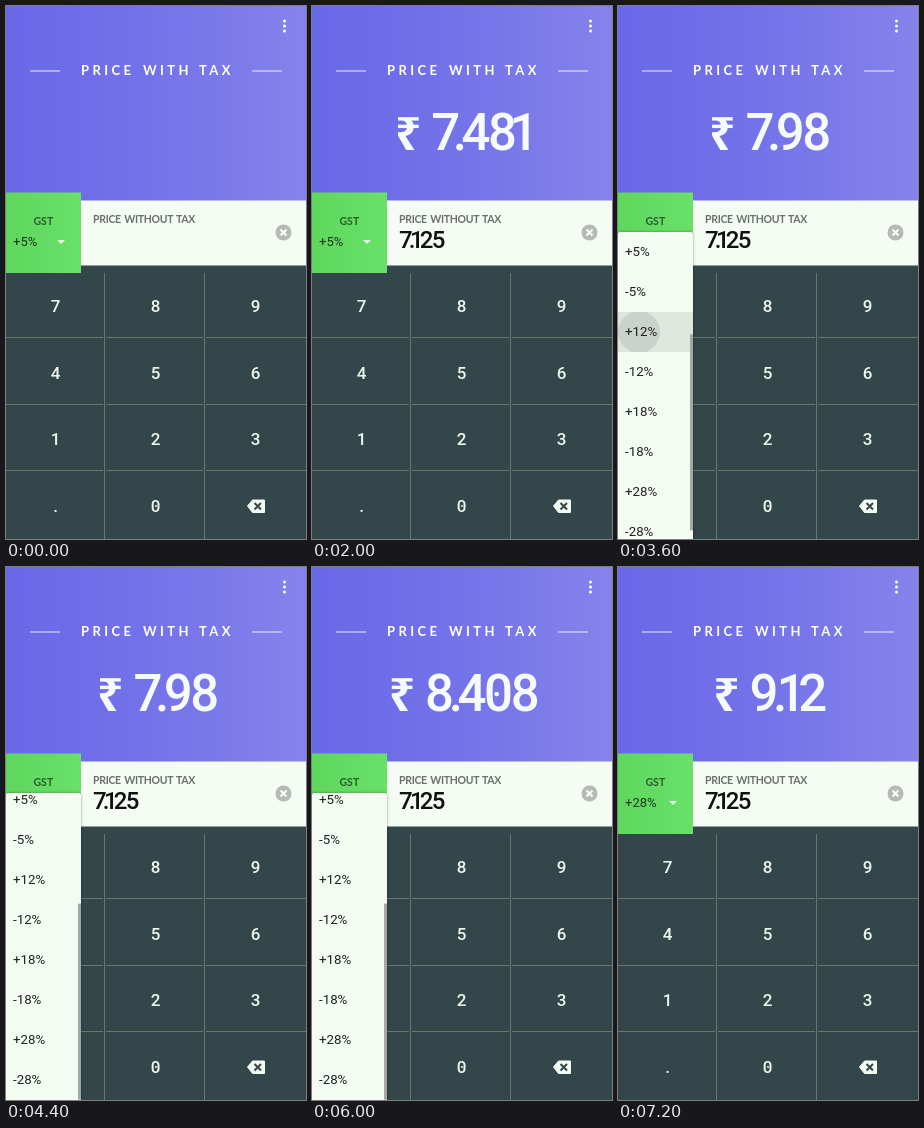
An HTML page that plays this animation: 300 px wide and 533 px high, repeating every 8000 ms.

```html
<!DOCTYPE html>
<html lang="en">
<head>
<meta charset="utf-8">
<title>Tax calculator</title>
<style>
  html, body { margin: 0; width: 100%; height: 100%; overflow: hidden; background: #33464a; }
  #stage { position: relative; width: 300px; height: 533px; overflow: hidden; font-family: Roboto, sans-serif; }
  svg { position: absolute; left: 0; top: 0; }
  .caps { font-family: Lato, sans-serif; font-weight: 700; }
  .title { font-size: 13px; letter-spacing: 3.4px; fill: #fff; }
  .key { font-size: 17px; font-weight: 500; fill: #edf7ee; text-anchor: middle; }

  #price {
    position: absolute; left: 0; top: 96px; width: 302px; height: 60px;
    display: flex; justify-content: center; align-items: baseline;
    color: #f6fbff; line-height: 60px; white-space: nowrap;
  }
  #price b { font: 900 46px/60px "Noto Sans", sans-serif; margin-right: 10px; }
  #total { font-size: 51px; font-weight: 500; letter-spacing: -.047em; }
  #value {
    position: absolute; left: 87px; top: 219px; line-height: 30px;
    font-size: 24px; font-weight: 500; letter-spacing: -.065em; color: #111; white-space: nowrap;
  }
  .dot { margin: 0 -.06em; }
  .d7 { margin-right: -.04em; }
  .d1 { margin: 0 -.1em 0 -.1em; }
  .d0 { background: radial-gradient(circle at 47% 51%, currentColor 0 2px, transparent 2.6px); }

  #rate { position: absolute; left: 7px; top: 226px; font-size: 13px; line-height: 20px; color: #17331b; }
  #menu {
    position: absolute; left: 0; top: 226px; width: 75px; height: 307px; overflow: hidden;
    background: #f4fbf3; border-radius: 2px 2px 0 0; box-shadow: 0 0 3px #0006;
  }
  #list div {
    position: relative; height: 40px; padding-left: 7px; overflow: hidden;
    font-size: 13.3px; line-height: 40px; color: #1c211c;
  }
  #list .on { background: #dfe6de; }
  #list .on::before {
    content: ""; position: absolute; left: 0; top: -1px; width: 42px; height: 42px;
    border-radius: 50%; background: #cbd1cb;
  }
  #list span { position: relative; }
  #thumb { position: absolute; right: 0; top: 0; width: 3px; height: 196px; background: #a3a8a4; }
</style>
</head>
<body>
<div id="stage">
  <svg width="300" height="533" viewBox="0 0 300 533">
    <defs>
      <linearGradient id="sky"><stop stop-color="#6968e7"/><stop offset=".5" stop-color="#7473e9"/><stop offset="1" stop-color="#8583eb"/></linearGradient>
      <linearGradient id="leaf"><stop stop-color="#5fd75d"/><stop offset="1" stop-color="#69e068"/></linearGradient>
    </defs>
    <rect width="300" height="196" fill="url(#sky)"/>
    <rect y="194.5" width="300" height="67" fill="#f4fcf4"/>
    <rect y="259.5" width="300" height="274" fill="#33464a"/>
    <rect y="186.5" width="75" height="80.5" fill="url(#leaf)"/>

    <g fill="#fff"><circle cx="278.5" cy="15" r="1.5"/><circle cx="278.5" cy="20" r="1.5"/><circle cx="278.5" cy="25" r="1.5"/></g>
    <path d="M24 65H54M246 65H276" stroke="#eef"/>
    <g class="caps title"><text x="75" y="68.5">PRICE</text><text x="137" y="68.5">WITH</text><text x="193" y="68.5">TAX</text></g>

    <text class="caps" x="87" y="217" font-size="10.5" letter-spacing="-.3" word-spacing="1.2" fill="#6b706b">PRICE WITHOUT TAX</text>
    <text class="caps" x="27.5" y="219" font-size="10.5" fill="#285f2c">GST</text>
    <path d="M51 234H59L55 238Z" fill="#e4fbe2"/>
    <circle cx="277.5" cy="226.5" r="8" fill="#b5bab5"/>
    <path d="M274.5 223.5l6 6m0-6l-6 6" stroke="#fff" stroke-width="2"/>

    <path d="M98.5 267V533M198.5 267V533M0 331.5H97M100 331.5H197M200 331.5H300M0 398.5H97M100 398.5H197M200 398.5H300M0 464.5H97M100 464.5H197M200 464.5H300" stroke="#68786f" fill="none"/>
    <g id="keys"></g>
    <circle cx="150" cy="500" r="1" fill="#edf7ee"/>
    <path d="M241.5 500L246.5 494H258.5V506.5H246.5Z" fill="#f3fbf3" stroke="#f3fbf3" stroke-linejoin="round"/>
    <path d="M248.5 497l6.5 6.5m0-6.5l-6.5 6.5" stroke="#33464a" stroke-width="2"/>
  </svg>
  <div id="price"><b>₹</b><span id="total"></span></div>
  <div id="value"></div>
  <div id="rate"></div>
  <div id="menu"><div id="list"></div><div id="thumb"></div></div>
</div>
<script>
  const $ = id => document.getElementById(id);
  const LOOP = 8000, ROW = 40, VIEW = 307;
  const rates = [0.25, -0.25, 3, -3, 5, -5, 12, -12, 18, -18, 28, -28];
  const label = r => (r > 0 ? '+' : '') + r + '%';

  // [start ms, typed value, tax rate, menu opacity, rate scrolled to, pressed rate]
  const steps = [
    [0, '', 5],
    [600, '7', 5],
    [1200, '7.', 5],
    [1400, '7.1', 5],
    [1600, '7.12', 5],
    [2000, '7.125', 5],
    [2800, '7.125', 5, .6, 5],
    [3000, '7.125', 5, 1, 5],
    [3600, '7.125', 12, 1, 5, 12],
    [3800, '7.125', 12],
    [4200, '7.125', 12, .6, 12],
    [4400, '7.125', 12, 1, 12],
    [4800, '7.125', 18, 1, 12, 18],
    [5000, '7.125', 18],
    [5600, '7.125', 18, .6, 18],
    [5800, '7.125', 18, 1, 18],
    [6400, '7.125', 28, 1, 18, 28],
    [6600, '7.125', 28]
  ];

  $('keys').innerHTML = [...'789456123.0'].map((c, i) =>
    `<text class="key" x="${49.7 + i % 3 * 100}" y="${306 + Math.floor(i / 3) * 66.7}">${c}</text>`).join('');
  $('list').innerHTML = rates.map(r => `<div><span>${label(r)}</span></div>`).join('');
  const rows = [...$('list').children];

  // Wrap the glyphs that need their own spacing or the dotted zero.
  const digits = s => s.replace(/[017.]/g, c => `<span class="${c === '.' ? 'dot' : 'd' + c}">${c}</span>`);
  const withTax = (v, r) => String(+(v * (1 + r / 100) + 1e-9).toFixed(3));

  function show([, value, rate, open = 0, top = 5, pressed]) {
    $('price').style.visibility = value ? 'visible' : 'hidden';
    $('total').innerHTML = digits(withTax(parseFloat(value) || 0, rate));
    $('value').innerHTML = digits(value);
    $('rate').textContent = label(rate);
    const height = rates.length * ROW;
    const scroll = Math.min(rates.indexOf(top) * ROW, height - VIEW);
    $('menu').style.opacity = open;
    $('list').style.transform = `translateY(${-scroll}px)`;
    $('thumb').style.transform = `translateY(${scroll * VIEW / height}px)`;
    rows.forEach((row, i) => row.classList.toggle('on', rates[i] === pressed));
  }

  let current;
  const start = performance.now();
  function tick() {
    const t = (performance.now() - start) % LOOP;
    const step = steps.findLast(s => s[0] <= t);
    if (step !== current) show(current = step);
    requestAnimationFrame(tick);
  }
  tick();
</script>
</body>
</html>
```
